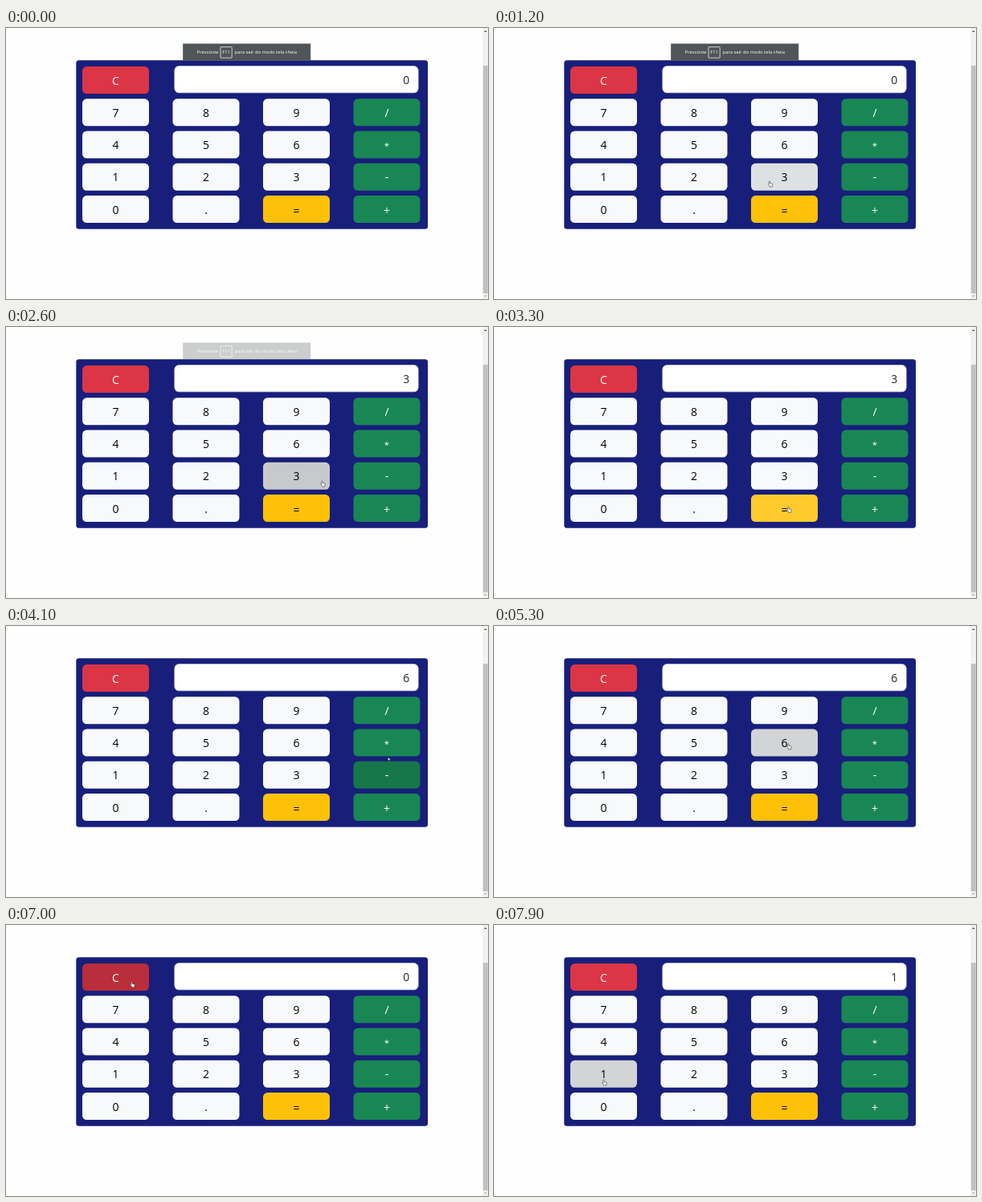
These frames come from a looping animation (600x338 px, 8 s). An HTML page:

```html
<!DOCTYPE html>
<html lang="pt">
<head>
<meta charset="utf-8">
<title>Calculadora</title>
<style>
  html, body { margin: 0; width: 100%; height: 100%; overflow: hidden; background: #fefefe; }
  svg { display: block; width: 100vw; height: 100vh; }
  text { font-family: "Open Sans", "Noto Sans", sans-serif; }
  .key text { font-size: 14px; text-anchor: middle; }
  .key .star { font-size: 11.5px; }
  #display { font-size: 14px; text-anchor: end; fill: #212529; }
  #toast text { font-size: 5.85px; fill: #fff; }
</style>
</head>
<body>
<svg viewBox="0 0 600 338">
  <rect width="600" height="338" fill="#fefefe"/>

  <g id="scrollbar">
    <rect x="593.3" width="6.7" height="338" fill="#f1f1f1"/>
    <rect x="593.9" y="47" width="5.8" height="284" fill="#c1c1c1"/>
    <path d="M595 5l1.8-2 1.8 2z" fill="#505050"/>
    <path d="M595 333.6l1.8 2 1.8-2z" fill="#a3a3a3"/>
  </g>

  <rect x="87.3" y="40.3" width="437.8" height="210.4" rx="3.5" fill="#171f7b"/>
  <rect x="209.8" y="47.5" width="303.4" height="33.3" rx="5.5" fill="#fff" stroke="#ced4da" stroke-width=".7"/>
  <text id="display" x="502.2" y="70">0</text>
  <g id="keys"></g>

  <g id="toast">
    <rect x="220.2" y="19.5" width="159" height="21" fill="#505658"/>
    <text x="237.8" y="32.4">Pressione</text>
    <rect x="267" y="23.6" width="14.2" height="13.6" rx=".6" fill="none" stroke="#fff" stroke-width=".7"/>
    <text x="274.1" y="32.4" text-anchor="middle">F11</text>
    <text x="284.6" y="32.4">para sair do modo tela cheia</text>
  </g>

  <g id="cursor" stroke="#222" stroke-width=".55" stroke-linejoin="round" fill="#fff">
    <path id="arrow" d="M0 0V4.7L1.1 3.7 1.9 5.4 2.6 5.1 1.9 3.5H3.3Z"/>
    <path id="hand" d="M-.7 .6Q0-.4 .6 .6V2.7L3.4 3.3Q4 3.5 3.9 4.2L3.3 6V7.2H0V6.2L-2.1 4Q-1.7 3-.7 3.8Z"/>
  </g>
</svg>

<script>
const LOOP = 8000, STEP = 100, FADE = 150, HOLD = 130;
const W = 83, H = 34;
const APPEAR = 400, START = [314, 216];
const BLACK = [0, 0, 0], WHITE = [255, 255, 255];
const $ = id => document.getElementById(id);

const clamp = v => Math.min(1, Math.max(0, v));
const smooth = v => v * v * (3 - 2 * v);
const mix = (a, b, k) => a.map((v, i) => v + (b[i] - v) * k);

// Base fill, shade that hover and press move towards, label colour
function themeOf(c) {
  if (c === 'C') return [[220, 53, 69], BLACK, '#fff'];
  if (c === '=') return [[255, 193, 7], WHITE, '#000'];
  if ('/*-+'.includes(c)) return [[25, 135, 84], BLACK, '#fff'];
  return [[248, 249, 250], BLACK, '#000'];
}

function makeKey(label, col, row) {
  const x = 95 + col * 112.5, y = 48.1 + row * 40.25;
  const [base, shade, ink] = themeOf(label);
  const drop = '=+'.includes(label) ? 0.9 : 0;
  const g = document.createElementNS('http://www.w3.org/2000/svg', 'g');
  g.setAttribute('class', 'key');
  g.innerHTML = `<rect x="${x}" y="${y}" width="${W}" height="${H}" rx="5.5"/>` +
    `<text x="${x + W / 2}" y="${y + 22.6 + drop}" fill="${ink}"` +
    `${label === '*' ? ' class="star"' : ''}>${label}</text>`;
  $('keys').append(g);
  return { label, x, y, base, shade, rect: g.firstChild };
}

const keys = [makeKey('C', 0, 0)];
['789/', '456*', '123-', '0.=+'].forEach((line, r) =>
  [...line].forEach((c, i) => keys.push(makeKey(c, i, r + 1))));

// Visits: key, offset from its centre, leave, arrive, press (if any)
const visits = [
  ['3', -18.5, 5, 1000, 1200, 1400],
  ['+', -12, -5, 1600, 1950, 2030],
  ['3', 32, 6, 2200, 2460, 2480],
  ['=', 5, -2, 2750, 3200, 3350],
  ['+', 0, -7, 3550, 3830],
  ['*', 2, 0, 3835, 4225, 4350],
  ['6', 5, 1, 4800, 5150, 5320],
  ['=', 5, 0, 5460, 5650, 5750],
  ['C', 20, 5.5, 6330, 6720, 6750],
  ['1', 0, 7, 7250, 7580, 7600]
].map(([label, dx, dy, leave, arrive, press]) => {
  const k = keys.find(k => k.label === label);
  return { label, leave, arrive, press, spot: [k.x + W / 2 + dx, k.y + H / 2 + dy] };
});

function cursorAt(t) {
  if (t < APPEAR) return null;
  const i = visits.filter(v => v.leave <= t).length - 1;
  if (i < 0) return START;
  const { leave, arrive, spot } = visits[i];
  return mix(i ? visits[i - 1].spot : START, spot, smooth(clamp((t - leave) / (arrive - leave))));
}

// Works the calculator with every key released by time t
function readout(t) {
  let shown = '0', held = 0, op = '', fresh = true;
  for (const { label, press } of visits) {
    if (!(press + HOLD <= t)) continue;
    if (label === 'C') {
      shown = '0';
      fresh = true;
    } else if (label === '=') {
      shown = String(op === '*' ? held * shown : held + Number(shown));
      fresh = true;
    } else if ('+*'.includes(label)) {
      held = Number(shown);
      op = label;
      fresh = true;
    } else {
      shown = fresh ? label : shown + label;
      fresh = false;
    }
  }
  return shown;
}

const inside = (k, p) =>
  !!p && p[0] >= k.x && p[0] <= k.x + W && p[1] >= k.y && p[1] <= k.y + H;
const pressed = (k, t) =>
  visits.some(v => v.label === k.label && t >= v.press && t < v.press + HOLD);

// Share of the last FADE ms in which a condition held
function level(test, t) {
  let n = 0;
  for (let d = 0; d < FADE; d += 10) n += test(t - d) ? 1 : 0;
  return n * 10 / FADE;
}

function draw(t) {
  const p = cursorAt(t);
  const over = keys.some(k => inside(k, p));
  for (const k of keys) {
    const hover = level(s => inside(k, cursorAt(s)), t);
    const push = level(s => pressed(k, s), t);
    const fill = mix(k.base, k.shade, 0.15 * hover + 0.05 * push).map(Math.round);
    k.rect.setAttribute('fill', `rgb(${fill})`);
  }
  $('cursor').style.display = p ? '' : 'none';
  if (p) $('cursor').setAttribute('transform', `translate(${p})`);
  $('hand').style.display = over ? '' : 'none';
  $('arrow').style.display = over ? 'none' : '';
  $('display').textContent = readout(t);
  $('toast').setAttribute('opacity', clamp((2735 - t) / 480));
}

let shown = -1;
const start = performance.now();
function tick() {
  const t = Math.floor(((performance.now() - start) % LOOP) / STEP) * STEP;
  if (t !== shown) draw(shown = t);
  requestAnimationFrame(tick);
}
tick();
</script>
</body>
</html>
```
